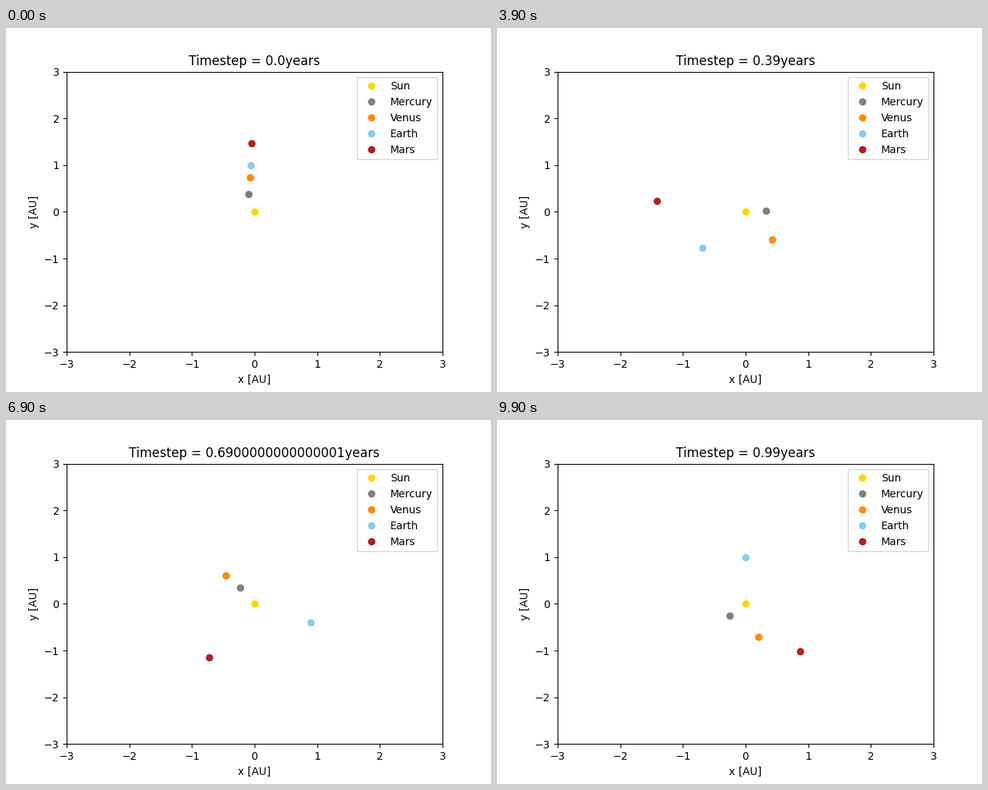
These frames come from a looping animation (640x480 px, 10000 ms). A matplotlib script:

```python
import numpy as np
import matplotlib.pyplot as plt
from matplotlib.animation import FuncAnimation

GM = 6.67e-11 * 2e30   # m^3 / s^2
AU = 1.496e11          # m
YEAR = 3.2e7           # s
DT = 0.01              # years per step
STEPS = 100

# name, colour, start distance [m], start speed [m/s]
PLANETS = [
    ("Mercury", "gray", 57e9, 47e3),
    ("Venus", "darkorange", 110e9, 35e3),
    ("Earth", "skyblue", AU, 30e3),
    ("Mars", "firebrick", 220e9, 24e3),
]


def orbit(dist, speed):
    """Semi-implicit Euler path around a fixed sun, in AU."""
    h = DT * YEAR
    pos = np.array([0.0, dist])
    vel = np.array([-speed, 0.0])
    path = []
    for _ in range(STEPS):
        pos = pos + vel * h
        vel = vel - GM * pos / np.hypot(*pos) ** 3 * h
        path.append(pos / AU)
    return np.array(path)


paths = [orbit(dist, speed) for _, _, dist, speed in PLANETS]

fig, ax = plt.subplots(figsize=(6.4, 4.8), dpi=100)
ax.plot([0], [0], "o", color="gold", label="Sun")
dots = [ax.plot([], [], "o", color=color, label=name)[0]
        for name, color, _, _ in PLANETS]
ax.set_xlim(-3, 3)
ax.set_ylim(-3, 3)
ax.set_xlabel("x [AU]")
ax.set_ylabel("y [AU]")
ax.legend(loc="upper right")
title = ax.set_title("")


def update(i):
    for dot, path in zip(dots, paths):
        dot.set_data(path[i:i + 1, 0], path[i:i + 1, 1])
    title.set_text(f"Timestep = {i * DT}years")
    return [*dots, title]


anim = FuncAnimation(fig, update, frames=STEPS, interval=100,
                     repeat=True, repeat_delay=0, blit=False)
plt.show()
```
